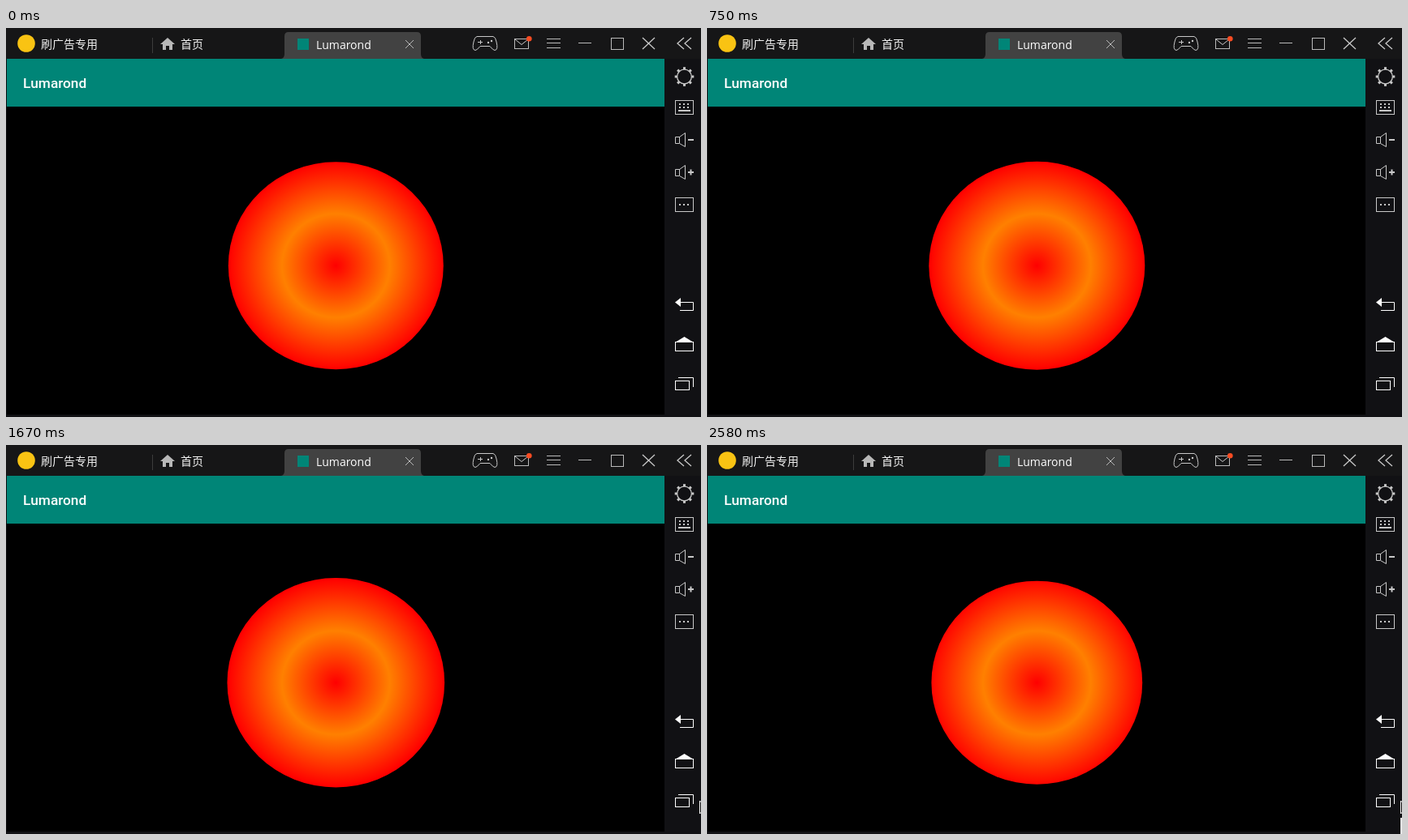
An HTML page with a canvas for the animation above (2660 ms loop, 856 px wide and 480 px high).

```html
<!DOCTYPE html>
<html lang="zh">
<head>
<meta charset="utf-8">
<style>
  html, body { margin: 0; width: 100%; height: 100%; overflow: hidden; background: #000; }
  canvas { display: block; }
</style>
</head>
<body>
<canvas id="stage" width="856" height="480"></canvas>
<script>
const ctx = document.getElementById('stage').getContext('2d');
const LOOP = 2660, STEP = 1000 / 12;
const CHROME = '#161617', SIDEBAR = '#111114', GREY = '#bababa', PALE = '#c8c8c8';
const CJK = '14px "Noto Sans CJK SC", "Noto Sans CJK", sans-serif';
const TITLE = 'Lumarond';

// [step, vertical radius]
const pulse = [[0, 128], [4, 128.6], [9, 128.5], [16, 128], [20, 129.3], [24, 128], [31, 125.5]];

function rect(x, y, w, h, color) {
  ctx.fillStyle = color;
  ctx.fillRect(x, y, w, h);
}

function box(x, y, w, h, color) {
  ctx.strokeStyle = color;
  ctx.strokeRect(x + 0.5, y + 0.5, w - 1, h - 1);
}

function disc(x, y, r, color) {
  ctx.fillStyle = color;
  ctx.beginPath();
  ctx.arc(x, y, r, 0, Math.PI * 2);
  ctx.fill();
}

function trace(points, close) {
  ctx.beginPath();
  points.forEach(([x, y]) => ctx.lineTo(x, y));
  if (close) ctx.closePath();
}

function line(color, points, close = false) {
  trace(points, close);
  ctx.strokeStyle = color;
  ctx.stroke();
}

function shape(color, points) {
  trace(points, true);
  ctx.fillStyle = color;
  ctx.fill();
}

function text(value, x, y, font, color) {
  ctx.font = font;
  ctx.fillStyle = color;
  ctx.fillText(value, x, y);
}

function drawTab() {
  ctx.fillStyle = '#424242';
  ctx.beginPath();
  ctx.moveTo(339, 38);
  ctx.quadraticCurveTo(343, 37, 343, 32);
  ctx.lineTo(343, 10);
  ctx.quadraticCurveTo(343, 5, 348, 5);
  ctx.lineTo(506, 5);
  ctx.quadraticCurveTo(511, 5, 511, 10);
  ctx.lineTo(511, 32);
  ctx.quadraticCurveTo(511, 37, 515, 38);
  ctx.fill();
  rect(359, 13, 14, 14, '#008577');
  text(TITLE, 382, 26, '14px "Open Sans", sans-serif', '#fff');
  line(GREY, [[492, 15], [502, 25]]);
  line(GREY, [[502, 15], [492, 25]]);
}

function drawGamepad() {
  ctx.strokeStyle = PALE;
  ctx.beginPath();
  ctx.moveTo(580, 10.5);
  ctx.lineTo(600, 10.5);
  ctx.quadraticCurveTo(603, 11, 604, 17);
  ctx.quadraticCurveTo(606.5, 27, 602, 27.5);
  ctx.quadraticCurveTo(600, 27.5, 596, 22.5);
  ctx.lineTo(584, 22.5);
  ctx.quadraticCurveTo(580, 27.5, 578, 27.5);
  ctx.quadraticCurveTo(573.5, 27, 576, 17);
  ctx.quadraticCurveTo(577, 11, 580, 10.5);
  ctx.stroke();
  line(PALE, [[581, 17.5], [587, 17.5]]);
  line(PALE, [[584.5, 15], [584.5, 20]]);
  disc(594, 18, 1.2, PALE);
  disc(598, 16, 1.2, PALE);
}

function drawTopBar() {
  rect(0, 0, 856, 38, CHROME);
  disc(25, 19, 10.8, '#f9c313');
  text('刷广告专用', 43, 24.5, CJK, '#eee');
  rect(180, 12, 1, 19, '#3c3c3c');
  shape('#b8b8b8', [[199, 12], [208, 20], [205, 20], [205, 27], [201, 27], [201, 22],
    [197, 22], [197, 27], [193, 27], [193, 20], [190, 20]]);
  text('首页', 215, 24.5, CJK, '#f6f6f6');
  drawTab();
  drawGamepad();

  box(626, 13, 18, 13, GREY);
  line(PALE, [[627, 14], [635, 20.5], [643, 14]]);
  disc(644.3, 13.3, 3.3, '#fa4c22');
  [13, 18, 24].forEach(y => rect(666, y, 17, 1, GREY));
  rect(705, 18, 16, 1, GREY);
  box(745, 12, 16, 15, GREY);
  ctx.lineWidth = 1.3;
  line(PALE, [[784, 12], [799, 26]]);
  line(PALE, [[799, 12], [784, 26]]);
  [835, 844].forEach(x => line(PALE, [[x, 12], [x - 8, 19], [x, 26]]));
  ctx.lineWidth = 1;
}

function drawGear() {
  ctx.strokeStyle = PALE;
  ctx.lineWidth = 1.3;
  ctx.beginPath();
  ctx.arc(835.5, 60, 8.9, 0, Math.PI * 2);
  ctx.stroke();
  ctx.lineWidth = 3;
  for (let i = 0; i < 8; i++) {
    const a = i * Math.PI / 4, c = Math.cos(a), s = Math.sin(a);
    line(PALE, [[835.5 + c * 9, 60 + s * 9], [835.5 + c * 11.8, 60 + s * 11.8]]);
  }
  ctx.lineWidth = 1;
}

function drawSpeaker(y, plus) {
  line(PALE, [[824.5, y - 3.5], [829.5, y - 3.5], [836.5, y - 8.5], [836.5, y + 8.5],
    [829.5, y + 4.5], [824.5, y + 4.5]], true);
  line(PALE, [[829.5, y - 4], [829.5, y + 4]]);
  rect(840, y - 1, 7, 2, PALE);
  if (plus) rect(842.5, y - 3.5, 2, 7, PALE);
}

function drawSidebar() {
  rect(811, 38, 45, 442, SIDEBAR);
  drawGear();

  box(824, 89, 23, 18, PALE);
  for (let x = 829; x <= 841; x += 5) {
    rect(x, 93, 2, 2, PALE);
    rect(x, 97, 2, 2, PALE);
  }
  rect(828, 101, 15, 2, PALE);

  drawSpeaker(138, false);
  drawSpeaker(178, true);
  box(824, 209, 23, 18, PALE);
  [829, 834, 839].forEach(x => rect(x, 217, 2, 2, PALE));

  shape('#fff', [[824, 338.5], [831, 333], [831, 344]]);
  line('#fff', [[830, 338.5], [846.5, 338.5], [846.5, 348.5], [830, 348.5]]);
  shape('#fff', [[835.5, 381], [847, 388], [824, 388]]);
  box(824, 387, 23, 12, '#fff');
  box(824, 435, 18, 12, '#fff');
  line('#fff', [[828, 431.5], [846.5, 431.5], [846.5, 443]]);
}

function drawApp() {
  rect(0, 38, 811, 442, SIDEBAR);
  rect(1, 97, 810, 380, '#000');
  rect(1, 38, 810, 59, '#008577');
  text(TITLE, 21, 73.5, '500 17.3px Roboto, sans-serif', '#fff');
}

function radiusAt(step) {
  const next = Math.max(1, pulse.findIndex(([at]) => at >= step));
  const [a, from] = pulse[next - 1], [b, to] = pulse[next];
  return from + (to - from) * (step - a) / (b - a);
}

function drawOrb(step) {
  ctx.save();
  ctx.translate(406.3, 293.2);
  ctx.scale(1.035, 1);
  const glow = ctx.createRadialGradient(0, 0, 0, 0, 0, 128);
  glow.addColorStop(0, '#ff0000');
  glow.addColorStop(0.5, '#ff8000');
  glow.addColorStop(1, '#ff0000');
  disc(0, 0, radiusAt(step), glow);
  ctx.restore();
}

function drawPointer(step) {
  if (step < 15) return;
  const points = step < 18
    ? [[843.5, 439.5], [848.5, 434.5], [848.5, 437.5], [858, 437.5],
       [858, 441.5], [848.5, 441.5], [848.5, 444.5]]
    : [[854.5, 439], [866, 450.5], [859, 450.5], [854.5, 455]];
  shape('#000', points);
  line('#fff', points, true);
  if (step >= 22) rect(854, 460, 2, 20, '#e4e4e4');
}

function draw(now) {
  const step = Math.min(31, Math.floor((now % LOOP + 5) / STEP));
  ctx.lineWidth = 1;
  drawApp();
  drawTopBar();
  drawSidebar();
  drawOrb(step);
  drawPointer(step);
}

let start;
function tick(now) {
  start ??= now;
  draw(now - start);
  requestAnimationFrame(tick);
}
draw(0);
requestAnimationFrame(tick);
</script>
</body>
</html>
```
